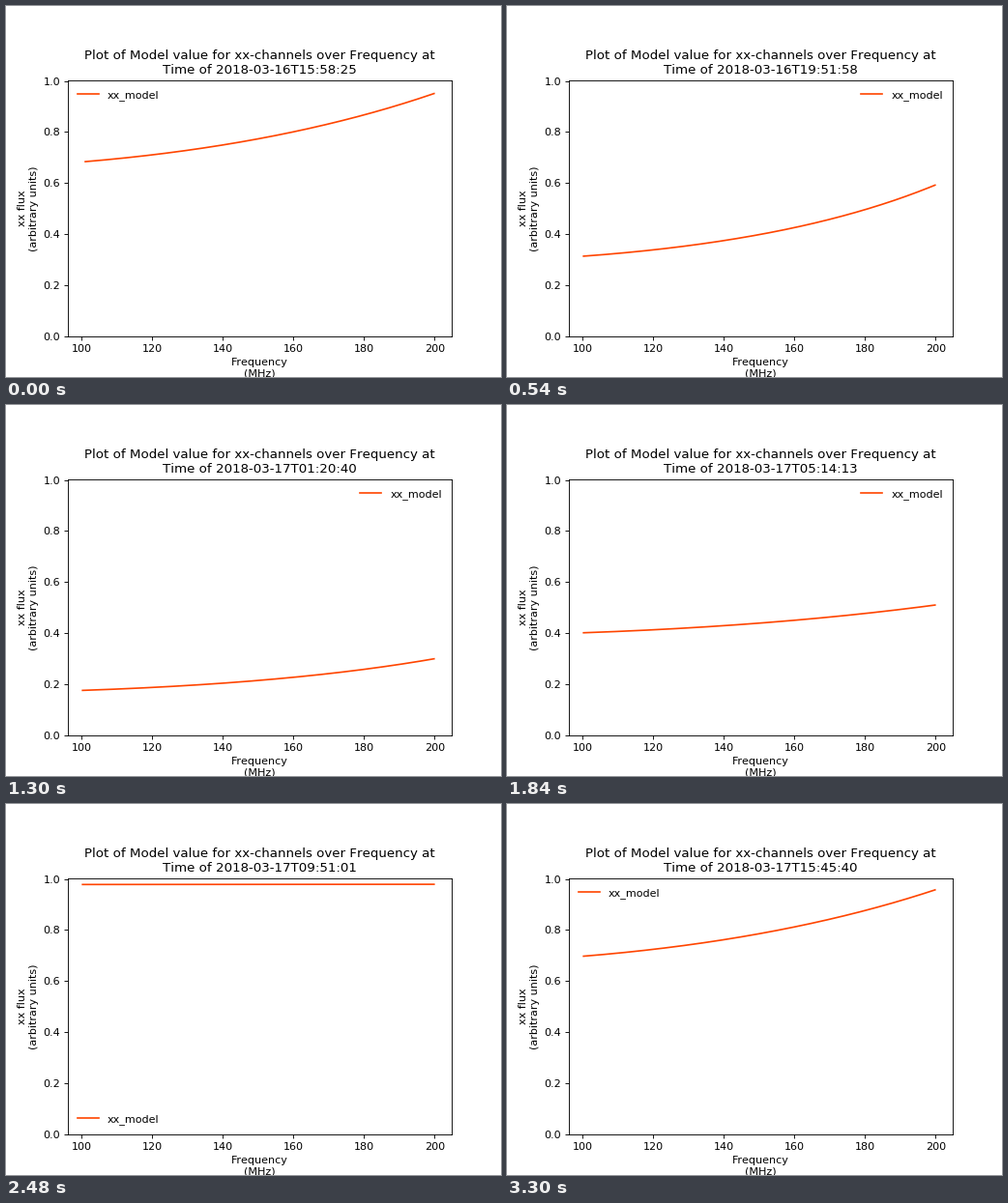
A matplotlib script that plays this animation: 512x384 px, repeating every 3.32 s.

```python
import numpy as np
import matplotlib.pyplot as plt
from matplotlib.animation import FuncAnimation

FRAMES = 166            # one full turn of the sky
INTERVAL = 20           # ms per frame
STEP = 519              # seconds of clock time per frame
START = 15 * 3600 + 58 * 60 + 25
CHANNEL = 100 / 512     # MHz between frequency channels
LEGEND_FLOOR = 0.904    # lower edge of a legend placed at the top


def flux(freq, k):
    """Beam response, as an exponential of the losses at this hour angle."""
    a = 2 * np.pi * k / FRAMES
    sky = (0.472 - 0.431 * np.cos(a) + 0.445 * np.sin(a)
           - 0.122 * np.sin(2 * a) + 0.0175 * np.cos(2 * a)
           - 0.012 * np.cos(3 * a))
    base = np.hypot(sky, 0.017)
    # Extra loss at 100 MHz, fading out towards 200 MHz
    extra = (0.337 * (1 + np.sin(a)) + 0.018 * np.sin(2 * a)
             - 0.005 * np.cos(a))
    s = freq / 100 - 1
    return np.exp(-base - extra * (1 - s * (1 + s) / 2))


def timestamp(k):
    days, sec = divmod(START + STEP * k, 86400)
    return (f"2018-03-{16 + days}T{sec // 3600:02d}:"
            f"{sec // 60 % 60:02d}:{sec % 60:02d}")


def legend_place(k):
    if flux(200, k) < LEGEND_FLOOR:
        return "upper right"
    if flux(123, k) < LEGEND_FLOOR:
        return "upper left"
    return "lower left"


def channels(first):
    return 100 + CHANNEL * np.arange(first, 512)


plt.rcParams["text.kerning_factor"] = 6
fig, ax = plt.subplots(figsize=(6.4, 4.8), dpi=80)
fig.subplots_adjust(left=0.125, right=0.9, bottom=0.11, top=0.8)

# The axes are fitted to the first, slightly shorter sweep
sweep = channels(5)
margin = 0.05 * np.ptp(sweep)
ax.set_xlim(sweep[0] - margin, sweep[-1] + margin)
ax.set_ylim(0, 1.003)
ax.set_xlabel("Frequency\n(MHz)")
ax.set_ylabel("xx flux\n(arbitrary units)")
title = ax.set_title("")
line, = ax.plot([], [], color="orangered", label="xx_model")
legend = ax.legend(loc="upper left", frameon=False)


def update(k):
    freq = sweep if k == 0 else channels(1)
    line.set_data(freq, flux(freq, k))
    title.set_text("Plot of Model value for xx-channels over Frequency at\n"
                   f"Time of {timestamp(k)}")
    legend.set_loc(legend_place(k))
    return line, title, legend


anim = FuncAnimation(fig, update, frames=FRAMES, interval=INTERVAL,
                     repeat=True, repeat_delay=0)
plt.show()
```
